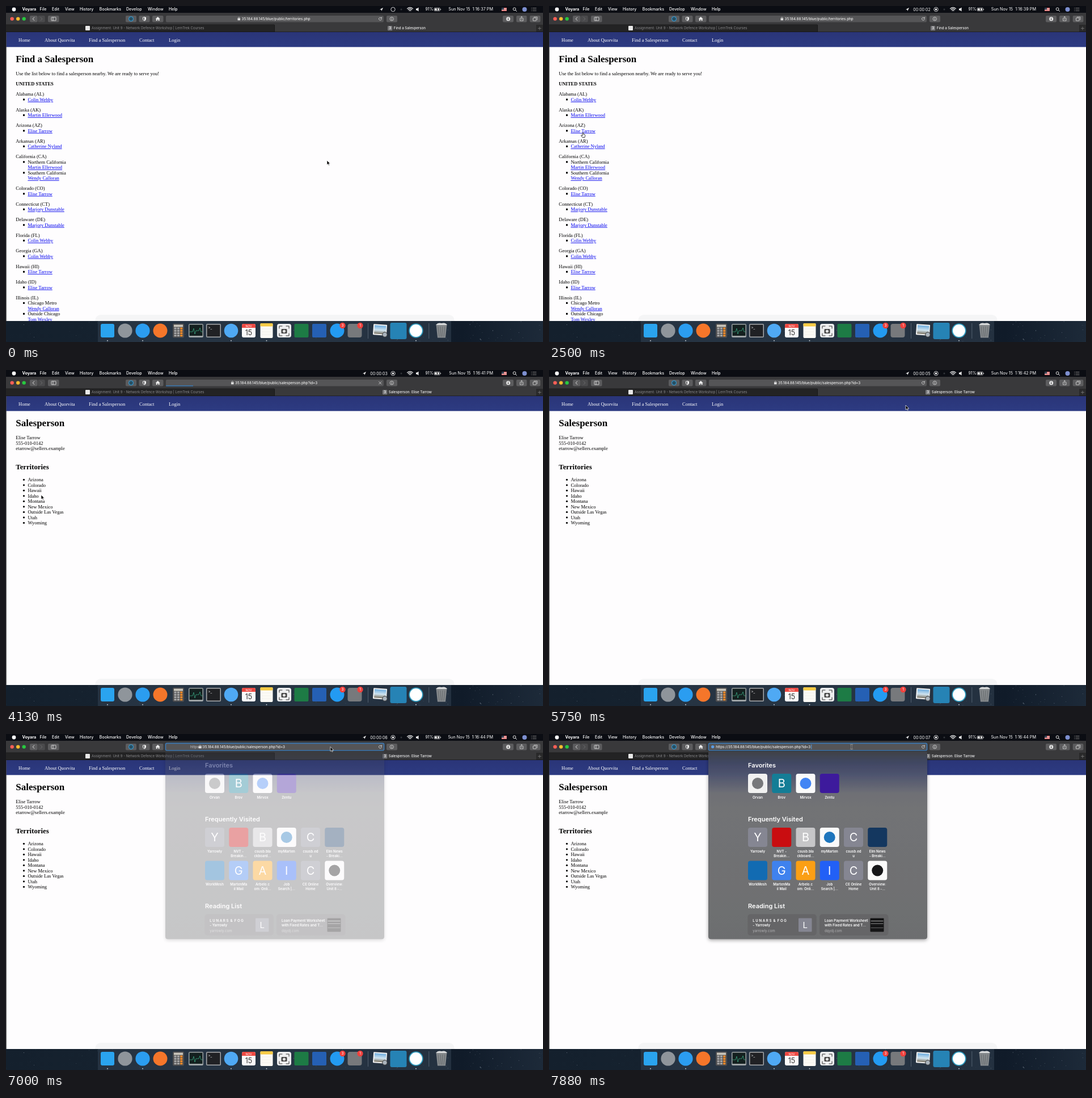
An HTML page for the animation above (8000 ms loop, 947 by 592 pixels).

```html
<!DOCTYPE html>
<html lang="en">
<head>
<meta charset="utf-8">
<title>Find a Salesperson</title>
<style>
  html, body { margin: 0; width: 100%; height: 100%; overflow: hidden; background: #0d1722; }
  svg { display: block; width: 947px; height: 592px; }
  text { white-space: pre; font-family: Inter, "Open Sans", sans-serif; }
  .page text { font-family: "Liberation Serif", "Noto Serif", serif; }
</style>
</head>
<body>
<svg id="stage" viewBox="0 0 947 592"></svg>
<script>
const LOOP = 8000;
const stage = document.getElementById('stage');

const attrs = o => Object.entries(o).map(([k, v]) => ` ${k}="${v}"`).join('');
const rect = (x, y, w, h, fill, r = 0, o = {}) =>
  `<rect x="${x}" y="${y}" width="${w}" height="${h}" rx="${r}" fill="${fill}"${attrs(o)}/>`;
const disc = (x, y, r, fill, o = {}) => `<circle cx="${x}" cy="${y}" r="${r}" fill="${fill}"${attrs(o)}/>`;
const path = (d, fill, o = {}) => `<path d="${d}" fill="${fill}"${attrs(o)}/>`;
const line = (d, stroke = '#ddd', width = .8, o = {}) =>
  path(d, 'none', { stroke, 'stroke-width': width, 'stroke-linecap': 'round', ...o });
const text = (x, y, size, s, fill = '#000', o = {}) =>
  `<text x="${x}" y="${y}" font-size="${size}" fill="${fill}"${attrs(o)}>${s.replace(/&/g, '&amp;')}</text>`;
const group = (id, body, o = {}) => `<g id="${id}"${attrs(o)}>${body}</g>`;
const MID = { 'text-anchor': 'middle' };
const BOLD = { 'font-weight': 700 };
const SEMI = { 'font-weight': 600 };

const PEOPLE = {
  d: 'Colin Webby', r: 'Martin Ellerwood', i: 'Elise Tarrow', e: 'Catherine Nyland',
  s: 'Wendy Calloran', b: 'Marjory Dunstable', k: 'Tom Wexley'
};

// Web pages

function territoriesPage() {
  const states = [
    ['Alabama (AL)', 'd'], ['Alaska (AK)', 'r'], ['Arizona (AZ)', 'i'], ['Arkansas (AR)', 'e'],
    ['California (CA)', 'Northern California', 'r', 'Southern California', 's'],
    ['Colorado (CO)', 'i'], ['Connecticut (CT)', 'b'], ['Delaware (DE)', 'b'], ['Florida (FL)', 'd'],
    ['Georgia (GA)', 'd'], ['Hawaii (HI)', 'i'], ['Idaho (ID)', 'i'],
    ['Illinois (IL)', 'Chicago Metro', 's', 'Outside Chicago', 'k']
  ];
  let out = text(17.3, 99.3, 17, 'Find a Salesperson', '#000', BOLD)
    + text(17.3, 122.3, 8.5, 'Use the list below to find a salesperson nearby. We are ready to serve you!')
    + text(17.3, 140.2, 8.5, 'UNITED STATES', '#000', BOLD);
  let y = 158.2;
  for (const [name, ...rows] of states) {
    out += text(17.3, y, 8.5, name);
    rows.forEach((row, n) => {
      y += 9.5;
      const person = PEOPLE[row];
      if (!person || n === 0) out += rect(30, y - 4.4, 3, 3, '#000');
      out += person
        ? text(38.4, y, 8.5, person, '#0000ee', { 'text-decoration': 'underline' })
        : text(38.4, y, 8.5, row);
    });
    y += 18;
  }
  return out;
}

function salespersonPage() {
  const places = ['Arizona', 'Colorado', 'Hawaii', 'Idaho', 'Montana', 'New Mexico',
    'Outside Las Vegas', 'Utah', 'Wyoming'];
  return text(17.3, 99.3, 17, 'Salesperson', '#000', BOLD)
    + [PEOPLE.i, '555-010-0142', 'etarrow@sellers.example'].map((s, n) => text(17.3, 122.3 + 9.5 * n, 8.5, s)).join('')
    + text(17.3, 175, 12.75, 'Territories', '#000', BOLD)
    + places.map((s, n) => disc(31.5, 193.3 + 9.5 * n, 1.6, '#000') + text(38.4, 196.2 + 9.5 * n, 8.5, s)).join('');
}

function webPage() {
  const nav = [[22, 'Home'], [68, 'About Quorvita'], [146, 'Find a Salesperson'], [235, 'Contact'], [287, 'Login']];
  return rect(0, 46, 947, 509, '#fefdfe') + rect(0, 46, 947, 26.3, 'url(#navFill)')
    + nav.map(([x, s]) => text(x, 62.6, 8.5, s, '#fff')).join('')
    + group('territories', territoriesPage(), { 'clip-path': 'url(#pageClip)' })
    + group('salesperson', salespersonPage())
    + path('M157 555 Q158 544 168 544 H780 Q790 544 791 555Z', '#f5f5f6')
    + rect(0, 46, .8, 509, '#444');
}

// Menu bar and browser window

function menuBar() {
  const menus = [[59.5, 'File'], [81, 'Edit'], [104, 'View'], [130, 'History'], [164.8, 'Bookmarks'],
    [212, 'Develop'], [250, 'Window'], [287, 'Help']];
  return rect(0, 0, 947, 12, '#0b0d13') + disc(14, 6, 3.4, '#fff')
    + text(28.5, 8.4, 7.2, 'Voyara', '#fff', BOLD)
    + menus.map(([x, s]) => text(x, 8.4, 7.1, s, '#fff', { 'font-weight': 500 })).join('')
    + group('locator', path('M3 -3 L-3 .2 L-.2 .4 L.1 3Z', '#fff'))
    + text(657.5, 8.6, 7, '', '#fff', { id: 'timer', ...MID })
    + disc(682.5, 6, 3.7, 'none', { stroke: '#fff', 'stroke-width': .8 })
    + rect(681, 4.5, 3, 3, '#fff', .5, { id: 'stopMark' })
    + disc(697, 6, 1.5, '#33363b')
    + line('M707.5 4.6 Q712.5 .6 717.5 4.6 M709.2 6.5 Q712.5 3.8 715.8 6.5 M711 8.2 Q712.5 7 714 8.2', '#fff', 1.1)
    + path('M723 4.6 H725 L727.5 2.5 V9.5 L725 7.4 H723Z', '#fff')
    + text(739.5, 8.4, 7, '91%', '#fff')
    + rect(755, 3.2, 10.5, 5.6, 'none', 1.4, { stroke: '#ccc', 'stroke-width': .7 }) + rect(756, 4.2, 8, 3.6, '#fff', .6)
    + rect(766.2, 5, .9, 2, '#ccc') + path('M761 3 L758.8 6.3 H760.6 L760 9 L762.4 5.6 H760.7Z', '#222')
    + text(859, 8.4, 7.25, '', '#fff', { id: 'clock', 'text-anchor': 'end' })
    + rect(874, 3, 9, 6, '#eee') + [3, 4.7, 6.4, 8.1].map(y => rect(874, y, 9, .9, '#d44')).join('') + rect(874, 3, 4, 3.4, '#345')
    + disc(896.6, 5.4, 2.4, 'none', { stroke: '#fff', 'stroke-width': .9 }) + line('M898.4 7.2 L900.6 9.4', '#fff', 1)
    + disc(914.5, 6, 4, '#7d8fd0')
    + line('M926.5 3.5 H927 M929 3.5 H935 M926.5 6 H927 M929 6 H935 M926.5 8.5 H927 M929 8.5 H935', '#777', .9);
}

function toolbar() {
  const button = (x, w, fill = '#5c5c5e') => rect(x, 17, w, 11.5, fill, 2);
  return rect(0, 12, 947, 34, '#39393b') + rect(0, 33, 473, 13, '#232324') + rect(0, 32.6, 473, .6, '#151516')
    + rect(473, 33, .8, 13, '#111') + rect(935, 33, 12, 13, '#29292a') + rect(0, 45.4, 947, .6, '#111')
    + ['#ff5f57', '#febc2e', '#28c840'].map((c, n) => disc(10.7 + 10.5 * n, 22.6, 3.2, c)).join('')
    + button(42, 13.5) + line('M49.8 20 L47.2 22.7 L49.8 25.4', '#eee', .9)
    + button(56.2, 12.5, '#4a4a4c') + line('M61.2 20 L63.8 22.7 L61.2 25.4', '#777')
    + button(74, 19.5) + rect(80, 19.8, 8, 6, 'none', .6, { stroke: '#eee', 'stroke-width': .8 }) + line('M83 20 V25.6', '#eee')
    + button(211, 19) + disc(220.5, 22.7, 4, '#275064', { stroke: '#37a6e6', 'stroke-width': 1 })
    + button(234.5, 19) + path('M244 19 L247 20 V22.7 Q247 25.3 244 26.5 Q241 25.3 241 22.7 V20Z', '#eee') + path('M244 20 V25.6 Q242 24.6 242 22.7 V20.7Z', '#5c5c5e')
    + button(258, 19.5) + path('M267.7 19 L263.7 22.7 H264.8 V26 H266.8 V23.7 H268.6 V26 H270.6 V22.7 H271.7Z', '#eee')
    + rect(282, 17, 384, 11.5, '#555557', 2)
    + rect(281.4, 16.4, 385.2, 12.6, 'none', 2.5, { id: 'focusRing', stroke: '#3c79b4', 'stroke-width': 1.6 })
    + rect(295, 18, 170, 9.5, '#3c6594', 0, { id: 'selection' })
    + disc(288.7, 22.6, 2.7, '#5b9be0', { id: 'siteDot' })
    + group('lock', rect(-2.3, -1.2, 4.6, 3.8, '#ddd', .5) + line('M-1.4 -1 V-2.2 Q0 -4 1.4 -2.2 V-1', '#ddd', .7))
    + text(0, 24.9, 6.25, 'https://', '#e8e8e8', { id: 'scheme', 'font-weight': 500, 'text-anchor': 'end' })
    + text(0, 24.9, 6.25, '', '#f0f0f0', { id: 'address', 'font-weight': 500 })
    + rect(462.4, 18.6, .8, 8, '#5db0ff', 0, { id: 'caret' })
    + rect(282, 27.4, 48, 1.1, '#2f86d8', 0, { id: 'progress' })
    + line('M662.2 21.5 A2.5 2.5 0 1 0 662.4 23.4 M662.4 19.8 V21.7 H660.6', '#ddd', .8, { id: 'reload' })
    + line('M657.6 20.5 L662 24.9 M662 20.5 L657.6 24.9', '#ddd', .8, { id: 'cancel' })
    + button(671, 19) + disc(680.3, 22.7, 3.2, 'none', { stroke: '#eee', 'stroke-width': .7 }) + line('M680.3 22.3 V24.3 M680.3 20.9 V21', '#eee')
    + button(876, 19) + disc(885.7, 22.7, 3.5, '#eee') + line('M885.7 20.8 V24.3 M884.3 23 L885.7 24.4 L887.1 23', '#444', .8)
    + button(900, 18.5) + line('M907.4 21.6 H906.6 V26 H912 V21.6 H911.2 M909.3 23.6 V18.8 M907.9 20 L909.3 18.6 L910.7 20', '#eee', .7)
    + button(923.7, 18.7) + rect(929.5, 21, 5.5, 5, 'none', .5, { stroke: '#eee', 'stroke-width': .7 }) + line('M931.2 19.4 H936.8 V24.3', '#eee', .7)
    + rect(140, 35, 8, 8, '#e8e8e8', 1)
    + text(151, 41.3, 6.1, 'Assignment: Unit 9 - Network Defence Workshop | LernTrek Courses', '#8b8b8d')
    + group('tabMark', rect(0, 35, 8.3, 8.3, '#77777a', 1.4) + text(4.1, 41.4, 6, '3', '#fff', { ...MID, ...SEMI }))
    + text(0, 41.4, 6.2, '', '#f0f0f0', { id: 'tabTitle', 'font-weight': 500 })
    + line('M938.4 39.4 H943.6 M940.9 36.9 V42', '#888', .7);
}

// Start panel below the address field

function tile(col, y, fill, letter, labels, mark) {
  const x = 351 + 42.25 * col, cx = x + 17;
  return rect(x, y, 34, 34, fill, 4)
    + (letter ? text(cx, y + 24.3, 20, letter, '#fff', MID) : '')
    + (mark ? disc(cx, y + 17, 10, mark) : '')
    + labels.map((s, n) => text(cx, y + 43.5 + 8 * n, 6.1, s, '#fff', { ...MID, ...SEMI })).join('');
}

function card(x, title, site, thumb) {
  return rect(x, 317.5, 121.5, 37.5, '#656567', 5)
    + title.map((s, n) => text(x + 9, 331 + 8 * n, 6.2, s, '#fff', SEMI)).join('')
    + text(x + 9, 348.6, 6.2, site, '#b4b4b6') + thumb;
}

function startPanel() {
  const grey = '#858692';
  const heading = (y, s) => text(351, y, 11, s, '#fff', SEMI);
  return path('M281 31 H667 V357 Q667 361.5 662 361.5 H286 Q281 361.5 281 357Z', 'url(#panelFill)', { filter: 'url(#shadow)' })
    + heading(58.6, 'Favorites')
    + tile(0, 70, '#f1f1f1', '', ['Orvan'], '#77787b') + tile(1, 70, '#147d96', 'B', ['Brov'])
    + tile(2, 70, '#fafafa', '', ['Mirvox'], '#4285f4') + tile(3, 70, '#3d1a9c', '', ['Zentu'])
    + heading(153.6, 'Frequently Visited')
    + tile(0, 165, grey, 'Y', ['Yarrowly']) + tile(1, 165, '#c90d10', '', ['NVT -', 'Breakin...'])
    + tile(2, 165, '#c6c6c8', 'B', ['csusb.bla', 'ckboard...']) + tile(3, 165, '#fafafa', '', ['myMarten'], '#1f76bd')
    + tile(4, 165, grey, 'C', ['csusb.ed', 'u']) + tile(5, 165, '#14375f', '', ['Elm News', '- Breaki...'])
    + tile(0, 223.5, '#126bb2', '', ['WorkMesh']) + tile(1, 223.5, '#3f82ee', 'G', ['MartenMa', 'il Mail'])
    + tile(2, 223.5, '#fb9f14', 'A', ['Arbelo.c', 'om: Onli...']) + tile(3, 223.5, '#2260f6', 'I', ['Job', 'Search |...'])
    + tile(4, 223.5, grey, 'C', ['CE Online', 'Home']) + tile(5, 223.5, '#fafafa', '', ['Overview:', 'Unit 8 -...'], '#161618')
    + heading(307.3, 'Reading List')
    + card(350.3, ['L U N A R S  &  F O G', '- Yarrowly'], 'yarrowly.com',
        rect(440, 324.5, 23.5, 24, grey, 1) + text(451.7, 342, 15, 'L', '#fff', MID))
    + card(477, ['Loan Payment Worksheet', 'with Fixed Rates and T...'], 'dqydj.com',
        rect(566.5, 324.5, 24, 24, '#161617', 1) + rect(567.5, 329, 22, 1, '#aaa') + rect(567.5, 333, 22, 2, '#555') + rect(567.5, 341, 22, 1, '#666'));
}

// Desktop and dock

function stars() {
  let seed = 7, out = '';
  const rnd = () => (seed = seed * 16807 % 2147483647) / 2147483647;
  for (let n = 0; n < 130; n++)
    out += disc((rnd() * 947).toFixed(1), (555 + rnd() * 37).toFixed(1), (.2 + rnd() * .4).toFixed(2), '#b9c6d2', { opacity: (.2 + rnd() * .6).toFixed(2) });
  return out;
}

function dock() {
  const square = (x, fill, r = 4, w = 24) => rect(x - w / 2, 560, w, 24, fill, r);
  const badge = (x, n) => disc(x, 563, 5.2, '#f0413d') + text(x, 565.4, 6.6, n, '#fff', MID);
  const keys = [0, 1, 2].map(c => [0, 1, 2, 3].map(r =>
    rect(296.5 + 5.3 * c, 566.5 + 4.2 * r, 4.2, 3.2, c === 2 ? '#f28b2a' : '#a5a5a5')).join('')).join('');
  return rect(0, 555, 947, 37, 'url(#sky)') + stars()
    + rect(162, 555, 623, 37, '#344253', 0, { opacity: .55 })
    + square(179, '#2aa4ef', 3) + disc(210, 572, 12.6, '#8f959b') + disc(241, 572, 12.6, '#2b9df0')
    + disc(272, 572, 12.5, '#f5762a')
    + rect(294, 559.5, 20, 25, '#4d4d4f', 2) + rect(296, 561.5, 16, 4, '#c9c5bb') + keys
    + square(335, '#9da3a5', 2.5, 26) + rect(323.5, 561.5, 23, 19.5, '#14201f')
    + line('M324 574 H329 L331 568 L333 578 L335 572 H340 L342 567 L344 574 H346', '#3eb88f', .7)
    + square(366, '#a9abad', 2, 26) + rect(354.5, 561.5, 23, 21, '#202124') + text(356.5, 569, 6, '>_', '#fff')
    + disc(397, 572, 12.3, '#4fa9f4')
    + square(428, '#fafafa', 3) + path('M416 567 V563 Q416 560 419 560 H437 Q440 560 440 563 V567Z', '#ee4a43')
    + text(428, 565.6, 5, 'NOV', '#fff', MID) + text(428, 579.8, 12.5, '15', '#333', MID)
    + rect(448.5, 559, 22, 26, '#fcfbf5', 2) + rect(448.5, 559, 22, 5.5, '#f8cb45', 1.5)
    + line('M451 569 H468 M451 574 H468 M451 579 H468', '#ddd', .4)
    + square(490.5, '#edeeef', 4, 25) + line('M482 568 V564 H487 M494 564 H499 V568 M499 577 V581 H494 M487 581 H482 V577', '#333', 1)
    + rect(485.5, 569, 10, 8, '#444', 1.5) + disc(490.5, 573, 2.6, '#ddd')
    + square(521, '#1d7b45', 2, 25) + square(552.5, '#2560b4', 2, 25)
    + disc(584, 572, 12.5, '#239bf2') + square(615, '#77797c', 4, 25) + badge(593.5, '3') + badge(624.5, '1')
    + rect(638, 559, .7, 27, '#667381') + rect(745.5, 559, .7, 27, '#667381')
    + rect(647.5, 561, 24, 19, '#f1f1f1', 1, { transform: 'rotate(4 660 571)' })
    + rect(649.5, 563, 20.5, 15, 'url(#photo)', 0, { transform: 'rotate(4 660 571)' }) + disc(668, 579, 4.2, '#aab4bd', { stroke: '#333' })
    + rect(677.5, 558, 29, 29, '#2683b5', 3) + disc(723, 572, 11.8, '#fff', { stroke: '#2c99bd', 'stroke-width': 1.8 })
    + path('M758.5 561 H777.5 L775 584.5 H761Z', '#85898c') + line('M762 565 L764 582 M766 565 L767 582 M770 565 L769 582 M774 565 L772 582', '#5e6265', .8)
    + path('M758 562 Q762 557 768 559 Q775 557 778 562Z', '#d9dbdc')
    + [179, 241, 397, 459.5, 723].map(x => disc(x, 589.6, .9, '#e4e9ee')).join('');
}

const gradient = (id, stops, dir = 'x2="0" y2="1"') => `<linearGradient id="${id}" ${dir}>`
  + stops.map(([o, c]) => `<stop offset="${o}" stop-color="${c}"/>`).join('') + '</linearGradient>';

stage.innerHTML = '<defs>'
  + gradient('navFill', [[0, '#2a3578'], [1, '#2d3b82']])
  + gradient('panelFill', [[0, '#414247'], [.06, '#414763'], [.12, '#4d536e'], [.22, '#6e6f75'], [.3, '#727375'], [1, '#6d6e70']])
  + gradient('sky', [[0, '#14202d'], [.5, '#182532'], [.85, '#101b29'], [1, '#1d2a39']], '')
  + gradient('photo', [[0, '#6faee0'], [.55, '#cfe3ef'], [1, '#7a7262']])
  + '<clipPath id="pageClip"><rect y="72" width="947" height="483"/></clipPath>'
  + '<filter id="shadow" x="-5%" y="-5%" width="110%" height="112%"><feDropShadow dx="0" dy="2" stdDeviation="3" flood-opacity=".35"/></filter></defs>'
  + group('web', webPage(), { class: 'page' }) + dock() + toolbar() + menuBar()
  + group('panel', startPanel())
  + group('arrow', path('M0 0 V8 L1.9 6.3 L3.1 9 L4.4 8.4 L3.2 5.8 H5.7Z', '#000', { stroke: '#fff', 'stroke-width': .7 }))
  + group('hand', path('M-.9 -3.5 Q0 -4.7 .9 -3.5 V-.9 L3 -.4 Q4 0 3.8 1.3 L3 4.6 H-1.1 L-3.4 1.4 Q-3.5 .3 -2.2 .7 L-.9 1.6Z', '#fff', { stroke: '#111', 'stroke-width': .8 }))
  + group('beam', line('M-1.4 -4 Q0 -4 0 -3 V3 Q0 4 -1.4 4 M1.4 -4 Q0 -4 0 -3 M0 3 Q0 4 1.4 4', '#fff', 1.5) + line('M-1.4 -4 Q0 -4 0 -3 V3 Q0 4 -1.4 4 M1.4 -4 Q0 -4 0 -3 M0 3 Q0 4 1.4 4', '#111', .8));

// Motion

const el = Object.fromEntries([...stage.querySelectorAll('[id]')].map(e => [e.id, e]));
const show = (id, on) => el[id].setAttribute('visibility', on ? 'visible' : 'hidden');
const move = (id, x, y) => el[id].setAttribute('transform', `translate(${x} ${y})`);
const write = (id, s) => { if (el[id].textContent !== s) el[id].textContent = s; };
const ease = p => p * p * (3 - 2 * p);
const ramp = (t, a, b) => Math.min(1, Math.max(0, (t - a) / (b - a)));
const pad = n => String(n).padStart(2, '0');

const POINTER = [[0, 566, 272], [1000, 566, 272], [2300, 60, 227], [3500, 60, 227], [4000, 62, 220],
  [4500, 62, 220], [5600, 629, 62], [5950, 629, 62], [6500, 572, 22.5], [7250, 572, 22.5], [7700, 533.5, 22.5], [LOOP, 533.5, 22.5]];

function pointerAt(t) {
  const n = POINTER.findIndex(k => k[0] > t);
  const [ta, xa, ya] = POINTER[n - 1], [tb, xb, yb] = POINTER[n];
  const p = ease(ramp(t, ta, tb));
  return [xa + (xb - xa) * p, ya + (yb - ya) * p];
}

function draw(t) {
  const recording = t >= 350, detail = t >= 3850, loading = t >= 3650 && t < 4500;
  const focused = t >= 6800, edited = t >= 7450;

  write('clock', `Sun Nov 15  1:16:${37 + Math.floor(t / 1000)} PM`);
  write('timer', recording ? `00:00:${pad(Math.floor((t - 350) / 1000))}` : '');
  move('locator', recording ? 632 : 662, 6);
  show('stopMark', recording);

  show('territories', !detail);
  show('salesperson', detail);
  write('tabTitle', detail ? `Salesperson: ${PEOPLE.i}` : 'Find a Salesperson');
  el.tabTitle.setAttribute('x', detail ? 674.7 : 683.8);
  move('tabMark', detail ? 664 : 673, 0);

  const slide = 1 - (1 - ramp(t, 6800, 7120)) ** 1.1;
  const start = !detail ? 415.5 : 404 + ((edited ? 316 : 317.8) - 404) * slide;
  write('address', `35.184.88.145/blue/public/${detail ? 'salesperson.php?id=3' : 'territories.php'}`);
  el.address.setAttribute('x', start);
  el.scheme.setAttribute('x', start);
  el.scheme.setAttribute('opacity', slide);
  move('lock', start - 4.7, 22.7);
  show('lock', slide < 1);
  show('siteDot', slide === 1);
  show('focusRing', focused);
  show('selection', slide === 1 && !edited);
  show('caret', edited);
  show('progress', loading);
  el.progress.setAttribute('width', 48 * ramp(t, 3650, 4050));
  show('cancel', loading);
  show('reload', !loading);
  el.panel.setAttribute('opacity', ramp(t, 6940, 7100));

  const [x, y] = pointerAt(t);
  const shape = t >= 7300 ? 'beam' : !detail && x < 82 ? 'hand' : 'arrow';
  for (const id of ['arrow', 'hand', 'beam']) show(id, id === shape);
  move(shape, x, y);
}

function tick(now) {
  draw(now % LOOP);
  requestAnimationFrame(tick);
}
draw(0);
requestAnimationFrame(tick);
</script>
</body>
</html>
```
